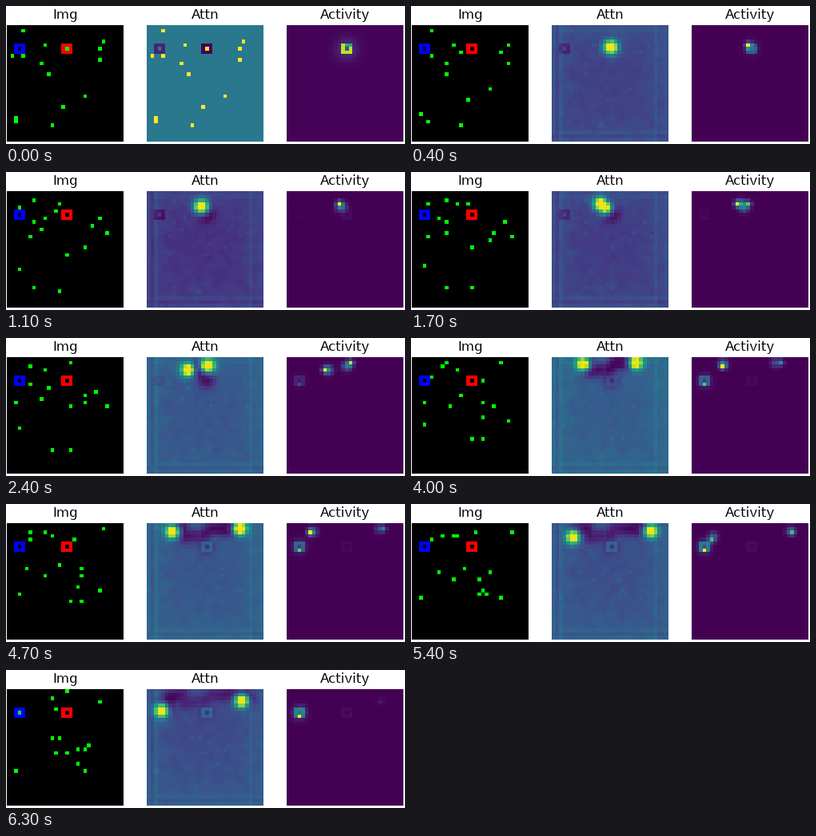
Write a matplotlib script that moves like this. It is 499x173 px and loops after 6400 ms.

```python
import numpy as np
import matplotlib.pyplot as plt
from matplotlib.animation import FuncAnimation

W, H, DPI = 499, 173, 100
N = 32
FRAMES, INTERVAL = 64, 100
LAST = FRAMES - 1
BLUE, RED = (3, 6), (16, 6)

plt.rcParams["font.family"] = "DejaVu Sans"
plt.rcParams["text.hinting"] = "native"
rng = np.random.default_rng(4)
cols, rows = np.meshgrid(np.arange(N), np.arange(N))

# The two followed dots: way points (column, row) at a few key times.
KEY_TIMES = [0, 11, 24, 33, 47, 54, LAST]
LEFTWARD = [(16, 6), (14, 3), (10, 3), (9, 1), (6, 2), (5, 4), (3, 6)]
RIGHTWARD = [(10, 5), (13, 5), (17, 1), (21, 1), (26, 1), (27, 2), (25, 3)]

# The other dots drift along arcs given by start, middle and end.
ARCS = np.array([
    [(4, 1), (11, 3), (12, 2)], [(1, 8), (7, 1), (13, 5)],
    [(15, 7), (5, 6), (12, 2)], [(4, 8), (12, 9), (14, 13)],
    [(9, 10), (9, 12), (13, 17)], [(11, 13), (2, 12), (12, 13)],
    [(21, 19), (20, 8), (16, 0)], [(2, 25), (3, 18), (2, 22)],
    [(2, 26), (14, 24), (19, 16)], [(15, 22), (18, 12), (22, 15)],
    [(12, 27), (18, 24), (21, 16)], [(26, 4), (23, 11), (16, 17)],
    [(25, 6), (20, 14), (19, 20)], [(25, 9), (27, 15), (21, 22)],
])


def ease(t, start, end):
    u = min(max((t - start) / (end - start), 0), 1)
    return u * u * (3 - 2 * u)


def followed(t):
    """Positions of the two followed dots, in cells."""
    return np.array([[np.interp(t, KEY_TIMES, axis) for axis in zip(*path)]
                     for path in (LEFTWARD, RIGHTWARD)])


def drifting(t):
    """Parabola through the three points of every arc."""
    u = t / LAST
    start, middle, end = ARCS.swapaxes(0, 1)
    return ((1 - u) * (1 - 2 * u) * start + 4 * u * (1 - u) * middle
            + u * (2 * u - 1) * end)


def to_cells(points):
    return np.clip(np.floor(points + 0.5), 0, N - 1).astype(int)


def paint_dots(grid, t, value):
    x, y = to_cells(np.vstack([followed(t), drifting(t)])).T
    grid[y, x] = value


def bump(center, sigma):
    x, y = center
    return np.exp(-((cols - x) ** 2 + (rows - y) ** 2) / (2 * sigma**2))


def ring(center):
    x, y = center
    return np.maximum(abs(cols - x), abs(rows - y)) == 1


def make_texture():
    """Soft noise, brighter toward the border, with faint frame lines."""
    noise = rng.normal(0, 0.02, (N, N))
    for axis in (0, 1):
        noise = (noise + np.roll(noise, 1, axis)) / 2
    reach = np.maximum(abs(cols - 15.5), abs(rows - 15.5)) / 15.5
    tex = noise + 0.06 * reach**3 - 0.02
    tex[(cols == 2) | (cols == 28)] += 0.04
    tex[(rows == 1) | (rows == 29)] += 0.02
    tex[(cols == 1) | (rows == 30)] -= 0.04
    return tex


TEXTURE = make_texture()
BLUE_RING, RED_RING = ring(BLUE), ring(RED)


def image(t):
    img = np.zeros((N, N, 3))
    paint_dots(img, t, (0, 1, 0))
    img[BLUE_RING] = (0, 0, 1)
    img[RED_RING] = (1, 0, 0)
    return img


def attention(t):
    if t == 0:
        att = np.full((N, N), 0.4)
        paint_dots(att, t, 1)
        att[BLUE_RING] = 0.1
        att[RED_RING] = 0
        return att

    base = (0.16 + 0.2 * np.exp(-t / 3) + 0.16 * ease(t, 11, 30)
            - 0.09 * ease(t, 33, LAST))
    att = base + TEXTURE + 0.04 * ease(t, 33, LAST) * (rows / N)
    dots = np.zeros((N, N))
    paint_dots(dots, t, 0.04)
    att += dots

    # Places already visited stay suppressed for a while.
    trail = np.zeros((N, N))
    for s in range(t - 8):
        fade = np.exp(-(t - s) / 45)
        for point, gain in zip(followed(s), (1, ease(s, 11, 18))):
            trail = np.maximum(trail, fade * gain * bump(point, 1.6))
    att *= 1 - 0.95 * np.clip(1.6 * trail, 0, 1)

    att[BLUE_RING] -= 0.13 * (1 - ease(t, 11, 33))
    att[RED_RING] += 0.17 * ease(t, 33, 47)

    first, second = followed(t - 2.5)
    spot = np.maximum(bump(first, 1.35), ease(t, 11, 18) * bump(second, 1.35))
    spot = np.clip(1.3 * spot, 0, 0.97)
    return np.clip(att + (1 - att) * spot, 0, 1)


def start_glow():
    glow = 0.15 * bump(RED, 2)
    glow[RED_RING] = 0.9
    glow[5, 16:18] = 0.6
    glow[6, 16] = 0.25
    return glow


def goal_glow():
    glow = 0.25 * bump(BLUE, 1.3)
    glow[BLUE_RING] = 0.42
    glow[7, 3] = 1
    return glow


START, GOAL = start_glow(), goal_glow()


def activity(t):
    if t == 0:
        return START + 0.01
    gains = (ease(t, 0, 4) * (1 - 0.9 * ease(t, 45, LAST)),
             ease(t, 10, 20) * (1 - 0.5 * ease(t, 25, 47))
             * (1 - 0.9 * ease(t, 54, LAST)))
    act = START * np.exp(-t / 3.5) + (0.02 + ease(t, 14, 42)) * GOAL
    for gain, here, past in zip(gains, to_cells(followed(t)), followed(t - 3)):
        act += gain * (bump(here, 0.55) + 0.5 * bump(past, 0.9))
    act[RED_RING] += 0.03 * ease(t, 24, 33)
    return np.clip(act / act.max(), 0, 1)


fig = plt.figure(figsize=(W / DPI, H / DPI), dpi=DPI, facecolor="white")


def panel(left, title, data):
    ax = fig.add_axes([left / W, 3 / H, 146 / W, 146 / H])
    ax.set_axis_off()
    ax.set_title(title, fontsize=12)
    return ax.imshow(data, cmap="viridis", vmin=0, vmax=1,
                     interpolation="nearest", aspect="auto")


makers = {"Img": image, "Attn": attention, "Activity": activity}
views = [(panel(1 + 175 * i, title, make(0)), make)
         for i, (title, make) in enumerate(makers.items())]


def update(t):
    for view, make in views:
        view.set_data(make(t))
    return [view for view, _ in views]


anim = FuncAnimation(fig, update, frames=FRAMES, interval=INTERVAL,
                     repeat=True, repeat_delay=0, blit=False)
plt.show()
```
